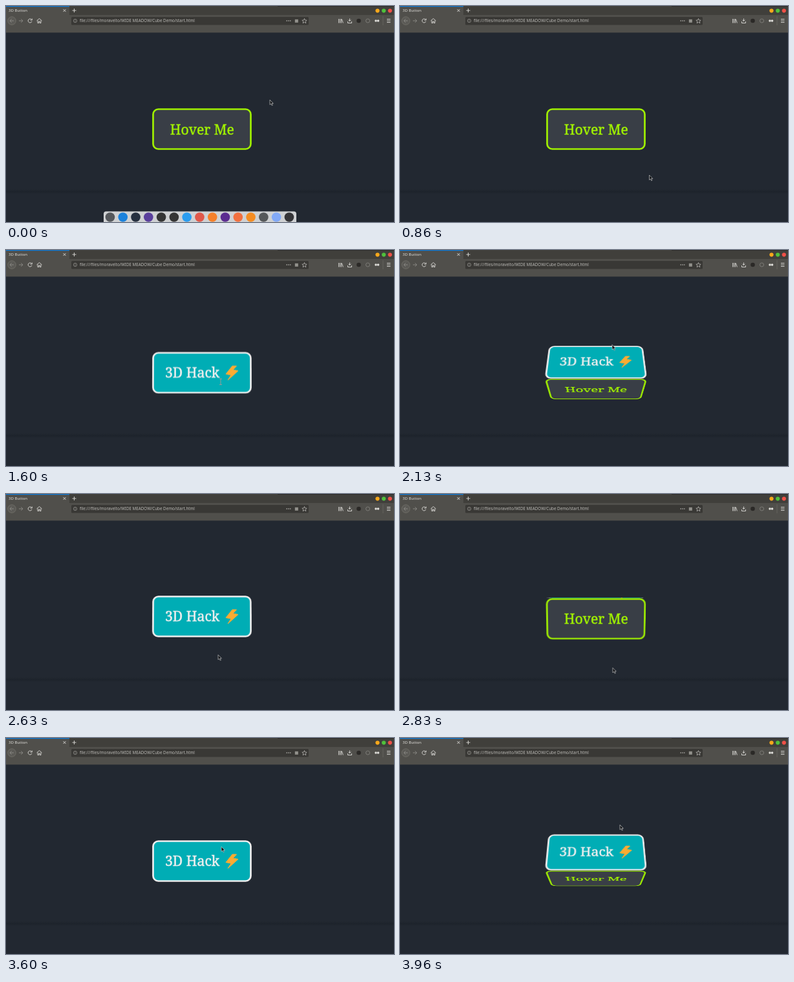
Animation of 600 by 336 pixels, one loop 4000 ms. Source, as an HTML page:

```html
<!DOCTYPE html>
<html lang="en">
<head>
<meta charset="utf-8">
<title>3D Button</title>
<style>
  html, body { margin: 0; width: 100%; height: 100%; overflow: hidden; background: #222831; }
  #stage { position: relative; width: 600px; height: 336px; overflow: hidden; }
  svg { position: absolute; left: 0; top: 0; }
  .ui { font: 6.1px "Noto Sans", sans-serif; fill: #dddcd8; }
  .ui .url { font-size: 6.25px; fill: #bdbcb8; }
  .line { fill: none; stroke: #dddcd8; stroke-width: .9; }
  .scene { position: absolute; left: 226px; top: 159px; width: 154px; height: 65px; perspective: 400px; }
  #cube { width: 100%; height: 100%; transform-style: preserve-3d; }
  .face { backface-visibility: hidden; font: 21.2px "Noto Serif", serif; overflow: visible; }
  .face rect { stroke-width: 2.7; }
  .face text { stroke-width: .5; }
  .front { transform: translateZ(32.5px); }
  .top { transform: rotateX(90deg) translateZ(32.5px); }
</style>
</head>
<body>
<div id="stage">
  <svg width="600" height="336">
    <defs>
      <linearGradient id="crease" x2="0" y2="1">
        <stop stop-color="#1d232b" stop-opacity="0"/>
        <stop offset=".6" stop-color="#1d232b"/>
        <stop offset="1" stop-color="#1d232b" stop-opacity="0"/>
      </linearGradient>
    </defs>
    <rect width="600" height="336" fill="#222831"/>
    <rect y="285" width="600" height="7" fill="url(#crease)"/>
    <!-- browser bars -->
    <rect width="600" height="14" fill="#403f3b"/>
    <rect x="420" width="180" height="1" fill="#2c2b29"/>
    <rect y="14" width="600" height="27.400" fill="#504f4b"/>
    <rect width="98" height="14" fill="#504f4b"/>
    <rect width="98" height="1.2" fill="#0a78d8"/>
    <rect x="101" y="17" width="367" height="12.5" rx="1.5" fill="#393835"/>
    <g class="ui">
      <text x="4" y="9.4">3D Button</text>
      <text class="url" x="114" y="25.4">file:///files/moravelto/WIDE MEADOW/Cube Demo/start.html</text>
    </g>
    <!-- toolbar icons -->
    <circle cx="9" cy="23" r="6.3" fill="#5b5a56" stroke="#77766f" stroke-width=".7"/>
    <g class="line">
      <path d="M88.500 5l4 4m0-4l-4 4M102.500 7h6M105.500 4v6"/>
      <path d="M12 23H6m2.700-2.700L6 23l2.700 2.700M20 23h6m-2.700-2.700L26 23l-2.700 2.700" stroke="#8d8c87"/>
      <path d="M39.800 21.500A3 3 0 1 0 40 24M40.300 19.500v2.500h-2.700"/>
      <path d="M47.500 23l4-3.500 4 3.500M49 22.500v4h1.700v-2.500h1.600v2.500H54v-4"/>
      <circle cx="107" cy="23" r="2.700" stroke="#a9a8a3" stroke-width=".6"/>
      <path d="M107 22.500v2M107 21v.7" stroke="#a9a8a3" stroke-width=".7"/>
      <path d="M433.500 23h1.500m1.200 0h1.500m1.200 0h1.500" stroke-width="1.200"/>
      <path d="M461.500 19.500l1 2.500 2.700.2-2 1.800.6 2.700-2.300-1.500-2.300 1.500.6-2.700-2-1.800 2.700-.2z" stroke-width=".6"/>
      <path d="M514.500 20v6.500M516.500 20v6.500M518.500 20v6.500M519.300 20.500l2 6"/>
      <path d="M531.500 19.500v4m-2-1.800l2 2 2-2M528.500 24v2.500h6V24"/>
      <path d="M583 16v14" stroke="#74736e" stroke-width=".6"/>
      <path d="M589 20.500h5.500M589 23h5.500M589 25.500h5.500"/>
    </g>
    <rect x="446.800" y="20.800" width="5" height="5" fill="#92918c"/>
    <circle cx="545.500" cy="23" r="3.300" fill="#2b2927"/>
    <circle cx="559.500" cy="23" r="3" fill="none" stroke="#7d7c77"/>
    <circle cx="572" cy="23" r="1.800" fill="#dddcd8"/>
    <circle cx="575.500" cy="23" r="1.800" fill="#dddcd8"/>
    <circle cx="574.500" cy="7.300" r="3.100" fill="#f7a81b"/>
    <circle cx="584.200" cy="7.300" r="3.100" fill="#4fc13c"/>
    <circle cx="593.800" cy="7.300" r="3.100" fill="#ef5048"/>
  </svg>

  <div class="scene">
    <div id="cube">
      <svg class="face front" width="154" height="65" fill="#a0f000" stroke="#a0f000">
        <rect x="1.500" y="1.500" width="151" height="62" rx="8" fill="#393e46"/>
        <text x="77.300" y="40.500" text-anchor="middle">Hover Me</text>
      </svg>
      <svg class="face top" width="154" height="65" fill="#eee" stroke="#eee">
        <rect x="1.500" y="1.500" width="151" height="62" rx="8" fill="#00adb5"/>
        <text x="19.900" y="40.300">3D Hack</text>
        <path d="M124 22L114 34.500l8 1.500-5 8L133 29.500l-8-1.500 5.500-6z" fill="#fbab32" stroke="#fbab32" stroke-linejoin="round"/>
      </svg>
    </div>
  </div>

  <svg width="600" height="336">
    <g id="dock"><rect x="151" y="319.500" width="298" height="30" rx="4" fill="#cfd1d3"/></g>
    <path id="arrow" d="M0 0V7.500L1.800 6 3.200 8.800 4.400 8.200 3.100 5.500H5.400Z" fill="#15171a" stroke="#dcdcdc" stroke-width=".6"/>
    <path id="beam" d="M-2-4.500h4M0-4.500v9M-2 4.500h4" fill="none" stroke="#9a9a96"/>
  </svg>
</div>
<script>
const LOOP = 4000, LAST = 3960, TURN = 300;
const $ = id => document.getElementById(id);
const cube = $("cube"), dock = $("dock"), arrow = $("arrow"), beam = $("beam");

// pointer path: time, x, y
const path = [
  [0, 408, 146], [530, 408, 146], [600, 385, 175], [670, 372, 222], [860, 385.5, 263],
  [1080, 385.5, 265], [1342, 350, 222], [1600, 332, 205], [1800, 330, 190], [2060, 328, 158],
  [2180, 328, 140], [2310, 328, 160], [2500, 326, 195], [2630, 328, 250], [2760, 330, 271],
  [3100, 325, 268], [3200, 322, 264], [3330, 320, 197], [3450, 325, 179], [3600, 333, 169],
  [3800, 336, 166], [3900, 338, 156], [LAST, 340, 135]
];

// times at which hovering starts and ends, in turn
const hovers = [555, 660, 1342, 2060, 2310, 2620, 3308, 3900];

const dockColors = ["#55585c", "#1b82dc", "#263040", "#5a3f9c", "#353535", "#353535", "#2a9df0",
  "#e0584a", "#f5802a", "#5b2c90", "#f2703f", "#f58d22", "#55585a", "#82a9f6", "#353538"];
dockColors.forEach((color, i) => {
  const dot = document.createElementNS("http://www.w3.org/2000/svg", "circle");
  const attrs = { cx: 161 + i * 19.78, cy: 328.5, r: 7.3, fill: color };
  for (const k in attrs) dot.setAttribute(k, attrs[k]);
  dock.append(dot);
});

const clamp = x => Math.max(0, Math.min(1, x));

// cubic-bezier(.25, .1, .25, 1)
function ease(x) {
  if (x <= 0 || x >= 1) return clamp(x);
  const curve = (a, b, s) => 3 * a * s * (1 - s) ** 2 + 3 * b * s * s * (1 - s) + s ** 3;
  let lo = 0, hi = 1;
  for (let i = 0; i < 24; i++) {
    const mid = (lo + hi) / 2;
    if (curve(.25, .25, mid) < x) lo = mid; else hi = mid;
  }
  return curve(.1, 1, lo);
}

// an interrupted turn reverses from where it is, in proportionally less time
function turnAt(t) {
  let from = 0, to = 0, start = 0;
  const value = now => from === to ? to
    : from + (to - from) * ease((now - start) / (TURN * Math.abs(to - from)));
  hovers.forEach((time, i) => {
    if (time > t) return;
    from = value(time);
    to = i % 2 ? 0 : 1;
    start = time;
  });
  return value(t);
}

function pointerAt(t) {
  const i = Math.max(1, path.findIndex(p => p[0] >= t));
  const [t0, x0, y0] = path[i - 1], [t1, x1, y1] = path[i];
  const k = (t - t0) / (t1 - t0);
  return [x0 + (x1 - x0) * k, y0 + (y1 - y0) * k];
}

function draw(now) {
  const t = Math.min(now % LOOP, LAST);
  cube.style.transform = `translateZ(-32.5px) rotateX(${-90 * turnAt(t)}deg)`;
  dock.setAttribute("transform", `translate(0 ${20 * clamp((t - 20) / 200)})`);
  const [x, y] = pointerAt(t);
  const onText = x > 250 && x < 358 && Math.abs(y - 192) < 14;
  arrow.style.display = onText ? "none" : "";
  beam.style.display = onText ? "" : "none";
  (onText ? beam : arrow).setAttribute("transform", `translate(${x} ${y})`);
}

const begin = performance.now();
(function tick() {
  draw(performance.now() - begin);
  requestAnimationFrame(tick);
})();
</script>
</body>
</html>
```
